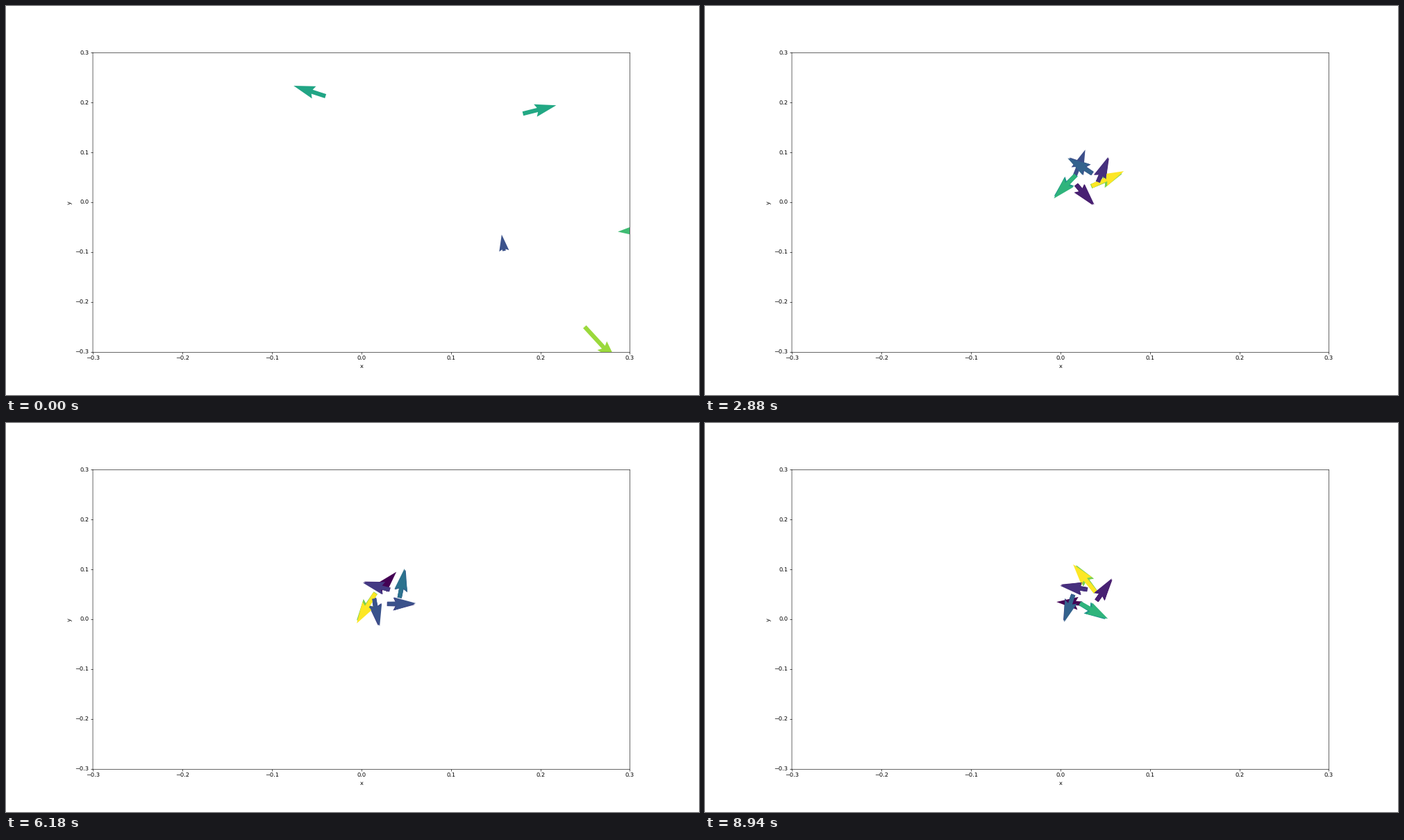
A matplotlib script that plays this animation: 998 by 561 pixels, repeating every 9 s.

```python
import numpy as np
import matplotlib.pyplot as plt
from matplotlib.animation import FuncAnimation

W, H, DPI = 998, 561, 59.4
FRAMES, INTERVAL = 150, 60
CENTER = np.array([0.0283, 0.0456])
RADIUS = 0.0145
PX_PER_UNIT = 2280            # arrow pixels per unit of speed
TURN, BACK_TURN = 75.88, -84  # degrees per frame

# Leaders circling counterclockwise: phase, mean level, swing of the level.
LEADERS = [(0, 1.0, 0), (43, 0.2, -0.06), (123, 0.28, 0.03),
           (202, 0.51, 0.14), (287, 0.13, -0.04)]

# Boids in view at the start: x, y and arrow in pixels.
STARTS = [
    (-0.040, 0.213, -46, 15), (0.1805, 0.178, 48, 12),
    (0.1595, -0.097, -3.5, 23.5), (0.330, -0.053, -56, -4),
    (0.2495, -0.249, 46, -50),
]

t = np.arange(FRAMES)
late = np.interp(t, [20, 44], [0, 1])     # 0 while gathering, 1 when settled
low = np.interp(t, [0, 20, 48], [5, 26, 37])
span = np.interp(t, [0, 20, 48], [74, 31, 14])


def wave(peak, period):
    return np.cos(2 * np.pi * (t - peak) / period)


def orbit(heading, lag, level, radius=1):
    """Positions and arrows of one boid circling the centre."""
    place, a = np.radians(heading + lag), np.radians(heading)
    r = RADIUS * radius
    size = low + span * np.clip(level, 0, 1)
    pos = CENTER + np.c_[r * np.cos(place), r * np.sin(place)]
    return pos, np.c_[size * np.cos(a), size * np.sin(a)]


def leader(phase, mean, swing, rank=0):
    """A leader, or with a rank one of the followers trailing behind it."""
    heading = 25 + phase + TURN * (t - 48) - rank * (16 - 14.5 * late)
    inner = 1 - 0.5 * (rank == 2) * (1 - late)
    early = 0.7 + 0.2 * np.cos(np.radians(heading[20] - 165))
    early = max(early, mean) * inner
    settled = (mean + swing * wave(48, 100)) * (0.8 if rank else 1)
    return orbit(heading, -87, early + (settled - early) * late, inner)


def backward():
    """The one boid that circles clockwise, with a slow wobble."""
    heading = 23 + BACK_TURN * (t - 48) + 56 * wave(60, 120)
    settled = np.maximum(0.75 * wave(128, 95) - 0.17, 0)
    return orbit(heading, 78, 0.8 + (settled - 0.8) * late)


def fly_in(pos, arrow, p0, a0):
    """Replace the first frames by a smooth curve from the start."""
    dist = np.hypot(*(p0 - CENTER))
    n = int(np.clip(round(dist / 0.023), 5, 16))
    s = (np.arange(n) / n)[:, None]
    p1 = pos[n].copy()
    m0, m1 = n * a0 / PX_PER_UNIT, n * arrow[n] / PX_PER_UNIT
    pos[:n] = ((2 * s**3 - 3 * s**2 + 1) * p0 + (s**3 - 2 * s**2 + s) * m0
               + (3 * s**2 - 2 * s**3) * p1 + (s**3 - s**2) * m1)
    slope = (6 * (s**2 - s) * (p0 - p1) + (3 * s**2 - 4 * s + 1) * m0
             + (3 * s**2 - 2 * s) * m1)
    flight = slope / n * PX_PER_UNIT
    size = np.hypot(*flight.T)[:, None]
    arrow[:n] = flight * np.minimum(1, 75 / np.maximum(size, 1e-6))


def build():
    boids = [leader(*spec, rank) for rank in (2, 1) for spec in LEADERS]
    boids += [backward()] + [leader(*spec) for spec in LEADERS]
    hidden = len(boids) - len(STARTS)
    for i, (pos, arrow) in enumerate(boids):
        if i < hidden:
            # just outside the lower and right edges
            a = np.radians(-125 + 140 * i / (hidden - 1))
            ray = np.array([np.cos(a), np.sin(a)])
            fly_in(pos, arrow, 0.35 * ray / np.abs(ray).max(), -20 * ray)
        else:
            start = np.array(STARTS[i - hidden])
            fly_in(pos, arrow, start[:2], start[2:])
    return [np.stack(part, 1) for part in zip(*boids)]


points, arrows = build()
levels = (np.hypot(arrows[..., 0], arrows[..., 1]) - low[:, None]) / span[:, None]
levels = np.clip(levels, 0, 1)

plt.rcParams.update({"font.family": "DejaVu Sans", "text.hinting": "none",
                     "axes.linewidth": 0.72})
fig, ax = plt.subplots(figsize=((W + 1e-6) / DPI, (H + 1e-6) / DPI), dpi=DPI)
fig.subplots_adjust(left=125.05 / W, right=898.45 / W,
                    bottom=1 - 499.3 / H, top=1 - 67.4 / H)
ax.set(xlim=(-0.3, 0.3), ylim=(-0.3, 0.3), xlabel="x", ylabel="y")
for spine in ax.spines.values():
    spine.set_snap(False)
quiver = ax.quiver(*points[0].T, *arrows[0].T, levels[0], cmap="viridis",
                   clim=(0, 1), scale=1, scale_units="dots", width=0.008)


def draw(n):
    quiver.set_offsets(points[n])
    quiver.set_UVC(*arrows[n].T, levels[n])
    return quiver,


anim = FuncAnimation(fig, draw, frames=FRAMES, interval=INTERVAL,
                     repeat=True, repeat_delay=0)
plt.show()
```
